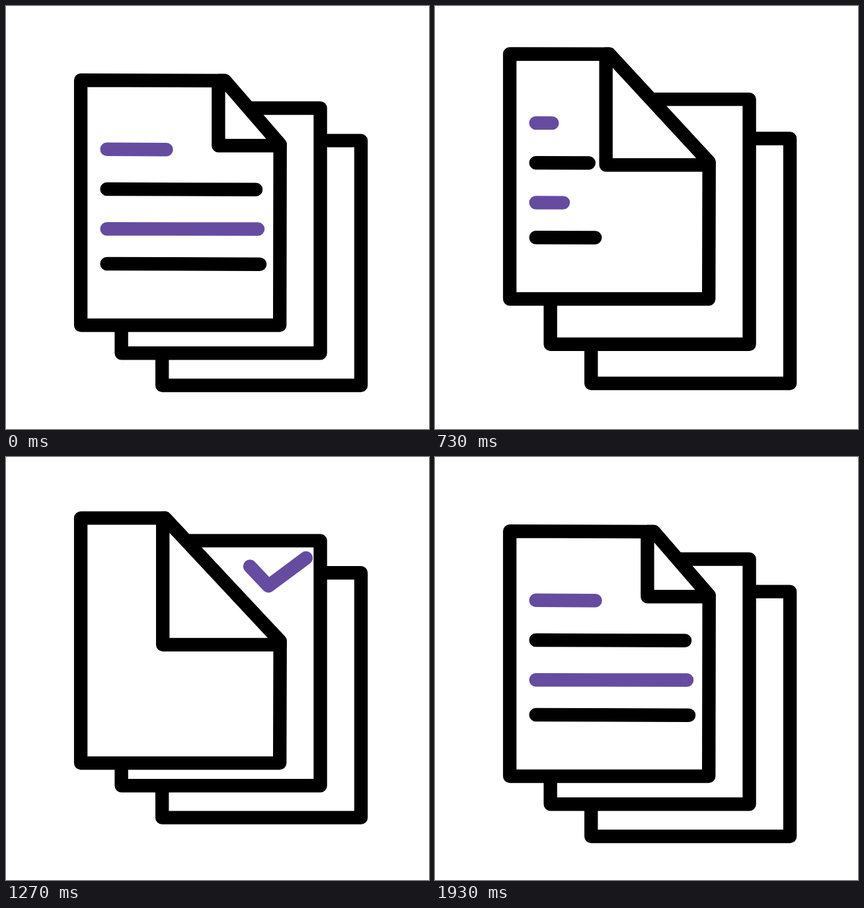
Recreate the animation shown at these times as an HTML page. Size 640 px wide and 640 px high, loop 2.5 s.

```html
<!DOCTYPE html>
<html lang="en">
<head>
<meta charset="utf-8">
<title>Turning pages</title>
<style>
  html, body { margin: 0; width: 100%; height: 100%; overflow: hidden; background: #fff; }
  svg { display: block; width: 100vw; height: 100vh; }
  path, line {
    fill: #fff; stroke: #000; stroke-width: 20.4;
    stroke-linecap: round; stroke-linejoin: round;
  }
  .accent { stroke: #664ca0; }
  #check { fill: none; }
</style>
</head>
<body>
<svg viewBox="0 0 640 640">
  <g id="back"><path d="M236.2 203.6H537.1V574H236.2Z"/></g>
  <g id="middle">
    <path d="M174.6 154.5H475.6V525.2H174.6Z"/>
    <path id="check" class="accent" pathLength="1" d="M369 193.3L397 223L454 180.7"/>
  </g>
  <g id="front">
    <path id="sheet"/>
    <g id="rows"></g>
    <path id="fold"/>
  </g>
</svg>
<script>
const LOOP = 2500, FPS = 30;
const $ = id => document.getElementById(id);
const mix = (a, b, p) => a + (b - a) * p;

// Eased progress between two moments, counted in ticks of 1/30 s.
function ease(t, from, to) {
  const u = Math.min(1, Math.max(0, (t - from) / (to - from)));
  return u * u * (3 - 2 * u);
}

// Goes from 0 to 1 and back again.
const pulse = (t, [a, b, c, d]) => ease(t, a, b) - ease(t, c, d);

const lifts = [
  { id: "front", height: 70.7, span: [15.5, 27.5, 30.2, 42.2] },
  { id: "middle", height: 51.7, span: [18, 30, 30.8, 46] },
  { id: "back", height: 41.5, span: [20, 32, 32, 48] }
];

const foldSpan = [15.5, 25.2, 48.5, 58];
const checkSpan = [24, 31, 51.5, 57.5];

const rows = [
  { y: 216.8, tilt: 0.4, length: 90, accent: true, span: [8.7, 29, 38.7, 50] },
  { y: 277, tilt: 0.8, length: 225.5, span: [11.6, 29, 42, 55] },
  { y: 337.3, tilt: 0.2, length: 228.5, accent: true, span: [5.9, 28, 38.5, 48.2] },
  { y: 390, tilt: 0.7, length: 231.5, span: [10.6, 30.4, 39.6, 51.2] }
];

for (const row of rows) {
  row.el = document.createElementNS("http://www.w3.org/2000/svg", "line");
  if (row.accent) row.el.setAttribute("class", "accent");
  $("rows").append(row.el);
}

function setLine(row, t) {
  const part = 1 - pulse(t, row.span);
  const size = row.length * part;
  const ends = { x1: 152.6, y1: row.y, x2: 152.6 + size, y2: row.y + row.tilt * part };
  for (const key in ends) row.el.setAttribute(key, ends[key]);
  row.el.style.visibility = size > 4 ? "visible" : "hidden";
}

function setFold(p) {
  const apexX = mix(331, 240.5, p), apexY = mix(113, 112.3, p);
  const cornerY = mix(209.5, 298.5, p);
  const foldX = mix(321.4, 237.2, p), foldY = mix(211.3, 303.9, p);
  $("sheet").setAttribute("d",
    `M113.1 112.3L${apexX} ${apexY}L414.7 ${cornerY}L414.2 483H113.1Z`);
  $("fold").setAttribute("d",
    `M${apexX} ${apexY}H${foldX}V${foldY}H414.5V${cornerY}Z`);
}

function draw(now) {
  const t = Math.floor((now % LOOP + 4) * FPS / 1000);
  for (const { id, height, span } of lifts)
    $(id).setAttribute("transform", `translate(0 ${-height * pulse(t, span)})`);
  setFold(pulse(t, foldSpan));
  for (const row of rows) setLine(row, t);

  const shown = pulse(t, checkSpan);
  $("check").style.strokeDasharray = `${shown} 2`;
  $("check").style.visibility = shown > 0.005 ? "visible" : "hidden";
}

const start = performance.now();
function tick() {
  draw(performance.now() - start);
  requestAnimationFrame(tick);
}
tick();
</script>
</body>
</html>
```
